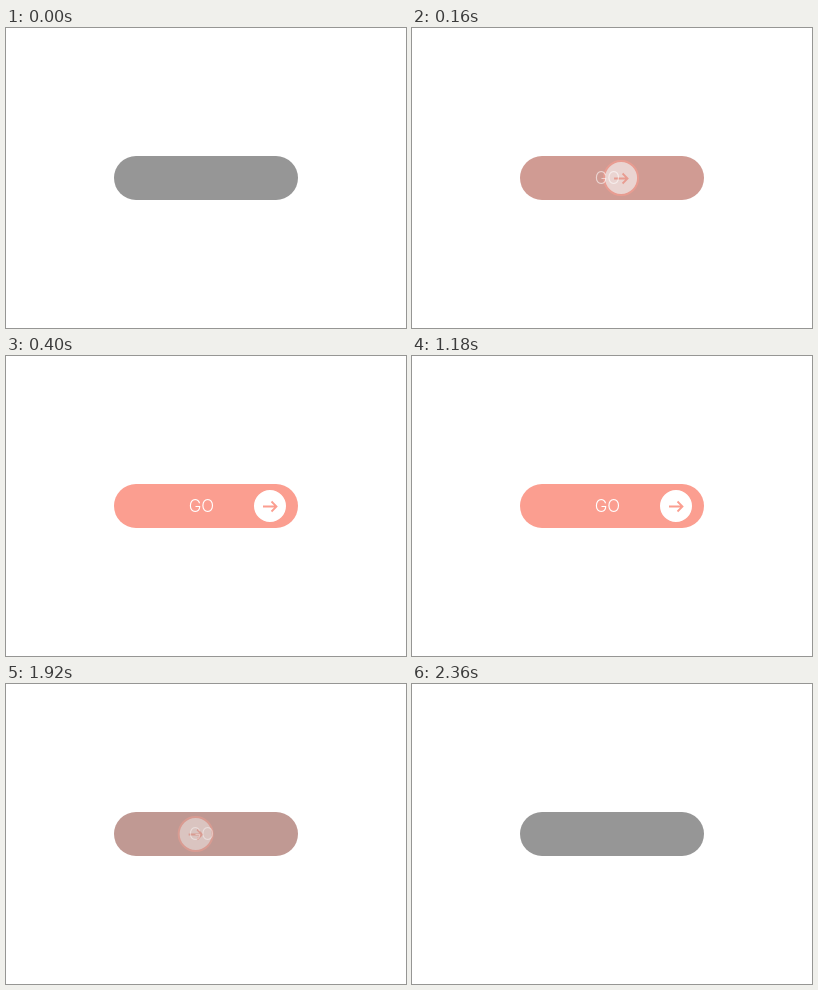
These frames come from a looping animation (400x300 px, 5100 ms). An HTML page:

```html
<!DOCTYPE html>
<html lang="en">
<head>
<meta charset="utf-8">
<title>Go switch</title>
<style>
html, body { margin: 0; width: 100%; height: 100%; overflow: hidden; background: #fff; }
svg { display: block; width: 100%; height: 100%; }
text { font: 300 17px Inter, Roboto, sans-serif; text-anchor: middle; fill: #fff; }
</style>
</head>
<body>
<svg viewBox="0 0 400 300">
  <rect id="track" x="108" y="128" width="184" height="44" rx="22"/>
  <g id="knob" stroke="#fb9e90">
    <circle r="17" fill="#fff" stroke-width="2"/>
    <path d="M-7 .5H6.5M1.5-4.5L6.5 .5L1.5 5.5" fill="none" stroke-width="1.8"/>
  </g>
  <text id="label" x="195.5" y="156">GO</text>
</svg>
<script>
const LOOP = 5100, DURATION = 360, ON_AT = 42, OFF_AT = 1800;
const OFF = [150, 150, 150], ON = [251, 158, 144];
const [track, knob, label] = ['track', 'knob', 'label'].map(id => document.getElementById(id));
const mix = (a, b, p) => a + (b - a) * p;

// cubic-bezier(.25, .1, .25, 1), solved by bisection
function ease(x) {
  if (x <= 0) return 0;
  if (x >= 1) return 1;
  let lo = 0, hi = 1, s;
  for (let i = 0; i < 24; i++) {
    s = (lo + hi) / 2;
    if (.75 * s * (1 - s) + s ** 3 < x) lo = s; else hi = s;
  }
  return .3 * s * (1 - s) ** 2 + 3 * s * s * (1 - s) + s ** 3;
}

function draw(t) {
  const p = ease((t - ON_AT) / DURATION) - ease((t - OFF_AT) / DURATION);
  track.setAttribute('fill', `rgb(${OFF.map((c, i) => Math.round(mix(c, ON[i], p)))})`);
  knob.setAttribute('transform', `translate(${mix(136, 264, p)} 150)`);
  knob.setAttribute('opacity', p);
  label.setAttribute('opacity', p);
}

const start = performance.now();
function tick() {
  draw((performance.now() - start) % LOOP);
  requestAnimationFrame(tick);
}
tick();
</script>
</body>
</html>
```
